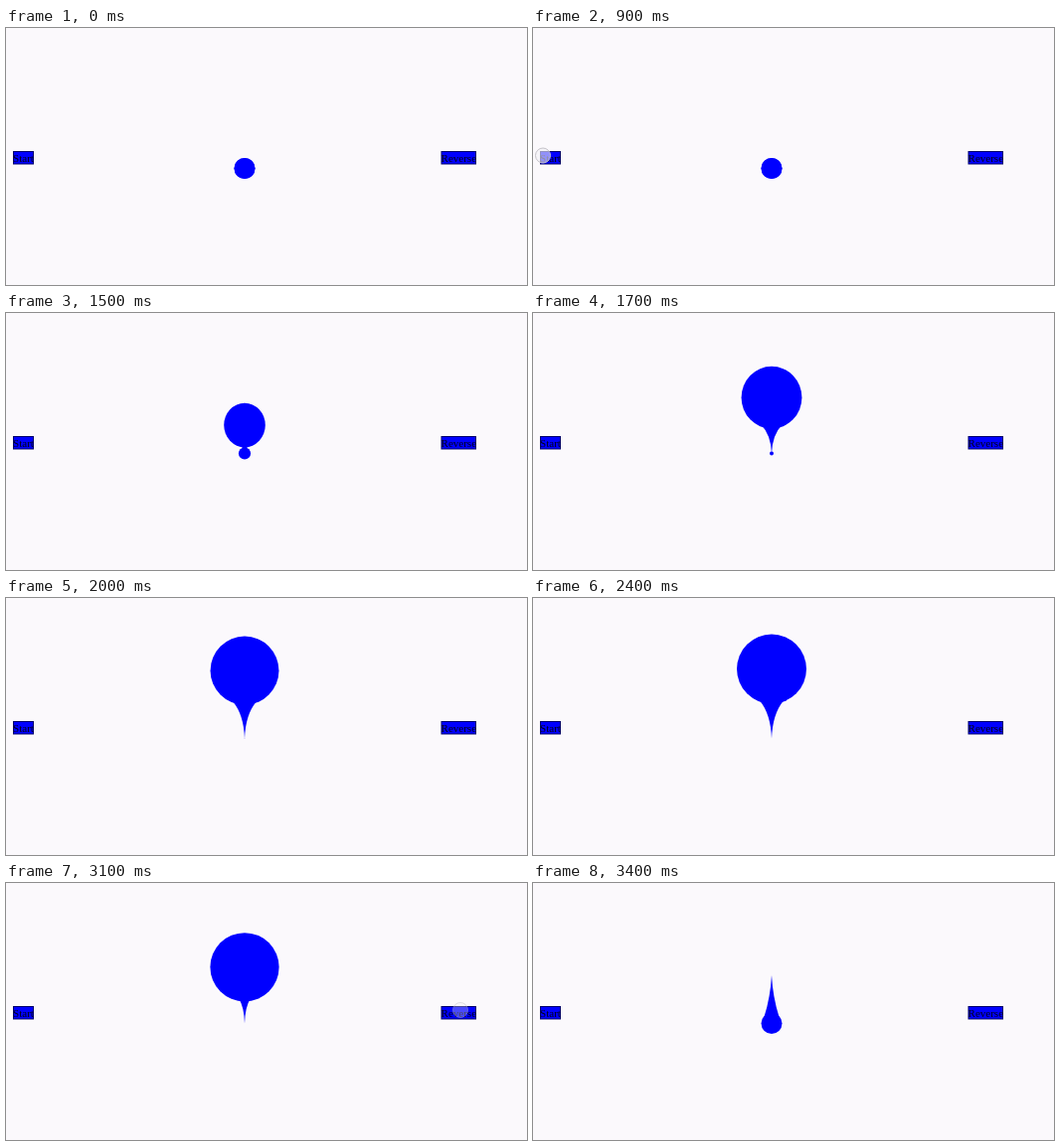
Animation of 524 by 259 pixels, one loop 3.5 s. Source, as an HTML page without scripts:

```html
<!DOCTYPE html>
<html lang="en">
<head>
<meta charset="utf-8">
<title>Balloon morph</title>
<style>
  /* clock in ticks of 100 ms; every moving part is derived from it */
  @property --t { syntax: "<number>"; inherits: true; initial-value: 0; }
  @keyframes clock { from { --t: 0; } to { --t: 35; } }

  html, body { margin: 0; width: 100%; height: 100%; overflow: hidden; background: #fbf9fc; }
  svg { display: block; width: 524px; height: 259px; animation: clock 3500ms steps(35) -1ms infinite; }
  rect { fill: #00f; stroke: #00006a; height: 12.5px; }
  text { font: 11px "Liberation Serif", serif; fill: #000018; }

  .goo {
    fill: #00f;
    /* rise: eased 0 to 1; sink: linear 0 to 1 */
    --rise: calc(1 - exp(-1 * pow(max(0, (var(--t) - 13.5) / 2.37), 1.327)));
    --sink: clamp(0, (var(--t) - 30) / 4, 1);
    --bulge: calc(var(--rise) * (1 - var(--rise)));
    --y: calc(141.5 - 70 * var(--rise) + 4 * var(--bulge) + 70 * pow(var(--sink), 1.2));
    --r: calc(10.5 + 24.5 * (var(--rise) - pow(var(--sink), 3)));
    --neck: calc(var(--y) + .91 * var(--r));
    --trail: calc(var(--y) - .67 * var(--r));
  }
  .head {
    cy: calc(1px * var(--y));
    rx: calc(1px * var(--r));
    ry: calc(1px * (var(--r) + 6 * var(--bulge)));
  }
  .foot { cy: 141.5px; r: calc(10.5px * (1 - var(--rise))); }
  .neck {
    transform: translateY(calc(1px * var(--neck)))
      scale(calc(var(--r) / 35 * max(0, 1 - 2 * var(--sink))), calc((141.5 - var(--neck)) / 38));
  }
  .trail {
    transform: translateY(calc(1px * var(--trail)))
      scale(calc(var(--r) / 10.5), max(0, 2 * var(--sink) - 1));
  }

  .tap {
    fill: #f4f2f6; fill-opacity: .6; stroke: #c4c2c8;
    --age: calc(var(--t) - var(--at));
    opacity: min(clamp(0, var(--age) + 1, 1), clamp(0, (4.5 - var(--age)) / 3, 1));
  }
</style>
</head>
<body>
<svg viewBox="0 0 524 259">
  <rect x="7.5" y="124.5" width="20"/>
  <text x="7.1" y="135">Start</text>
  <rect x="438" y="124.5" width="34.5"/>
  <text x="437.6" y="135">Reverse</text>

  <g class="goo" transform="translate(240)">
    <path class="neck" d="M-12 0Q-1 13 0 38Q1 13 12 0Z"/>
    <path class="trail" d="M-7.4 0Q-1.2 -19.5 0 -41.5Q1.2 -19.5 7.4 0Z"/>
    <circle class="foot"/>
    <ellipse class="head"/>
  </g>

  <circle class="tap" style="--at: 9" cx="10" cy="128.5" r="7.5"/>
  <circle class="tap" style="--at: 28" cx="457" cy="128" r="7.5"/>
</svg>
</body>
</html>
```
